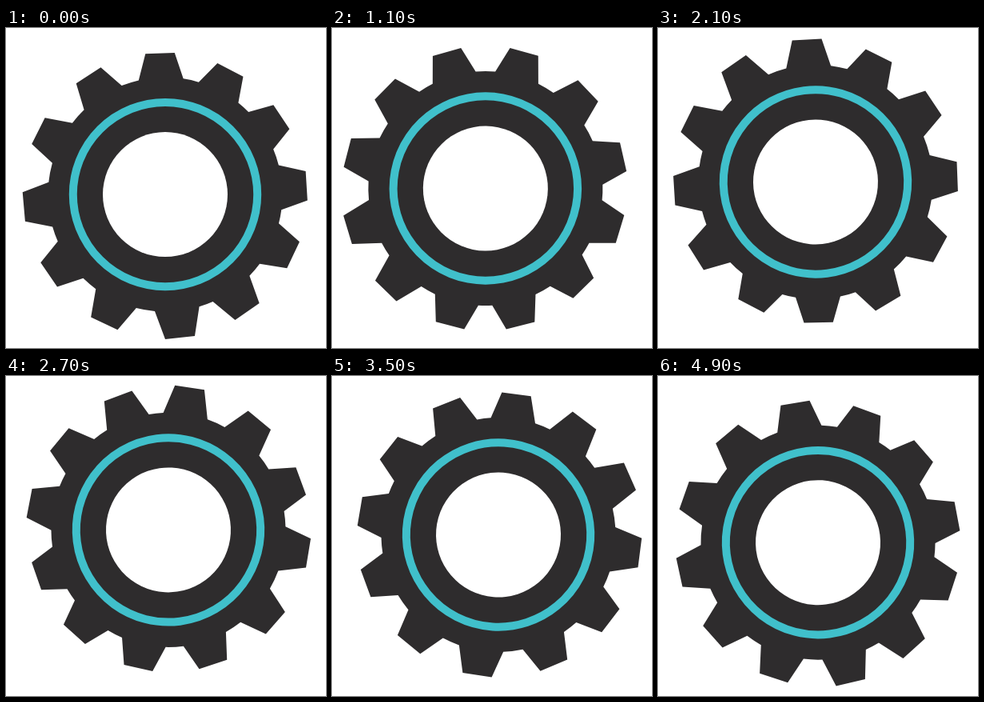
Recreate the animation shown at these times as an HTML page. Size 400x400 px, loop 5 s.

```html
<!DOCTYPE html>
<html lang="en">
<head>
<meta charset="utf-8">
<title>Turning gear</title>
<style>
html, body { margin: 0; width: 100%; height: 100%; overflow: hidden; background: #fff; }
svg { display: block; width: 100%; height: 100%; }
</style>
</head>
<body>
<svg viewBox="0 0 400 400">
  <g id="gear">
    <g transform="translate(199 208.1)">
      <path id="body" fill="#2e2c2d"/>
      <circle r="115.2" fill="none" stroke="#40c0cb" stroke-width="10"/>
      <circle r="78" fill="#fff"/>
    </g>
  </g>
</svg>
<script>
const LOOP = 5000, STEP = 100;
const ROOT = 146.5, ROOT_HALF = 11, TIP_HALF = 5.9;

// Slightly uneven hand-drawn teeth: [middle angle in degrees, tip radius]
const teeth = [
  [-92.1, 177.6], [-62.4, 176.6], [-33.7, 175.6], [-3.5, 178],
  [25.3, 178], [55, 179.7], [84.1, 180.8], [115.3, 179.2],
  [145.4, 177.5], [175, 178.3], [206.6, 178.3], [237.2, 178]
];

const polar = (angle, r) => {
  const a = angle * Math.PI / 180;
  return `${(r * Math.cos(a)).toFixed(2)} ${(r * Math.sin(a)).toFixed(2)}`;
};

const outline = teeth.map(([mid, tip], i) =>
  (i ? `A${ROOT} ${ROOT} 0 0 1 ` : 'M') + polar(mid - ROOT_HALF, ROOT) +
  'L' + polar(mid - TIP_HALF, tip) +
  'L' + polar(mid + TIP_HALF, tip) +
  'L' + polar(mid + ROOT_HALF, ROOT)
).join('');
const start = polar(teeth[0][0] - ROOT_HALF, ROOT);
document.getElementById('body').setAttribute('d', `${outline}A${ROOT} ${ROOT} 0 0 1 ${start}Z`);

// The gear turns about the stage centre, a little off its own hub
const gear = document.getElementById('gear');
function draw(now) {
  const step = Math.floor((now % LOOP) / STEP);
  gear.setAttribute('transform', `rotate(${step * STEP / LOOP * 360} 200 200)`);
  requestAnimationFrame(draw);
}
draw(0);
</script>
</body>
</html>
```
